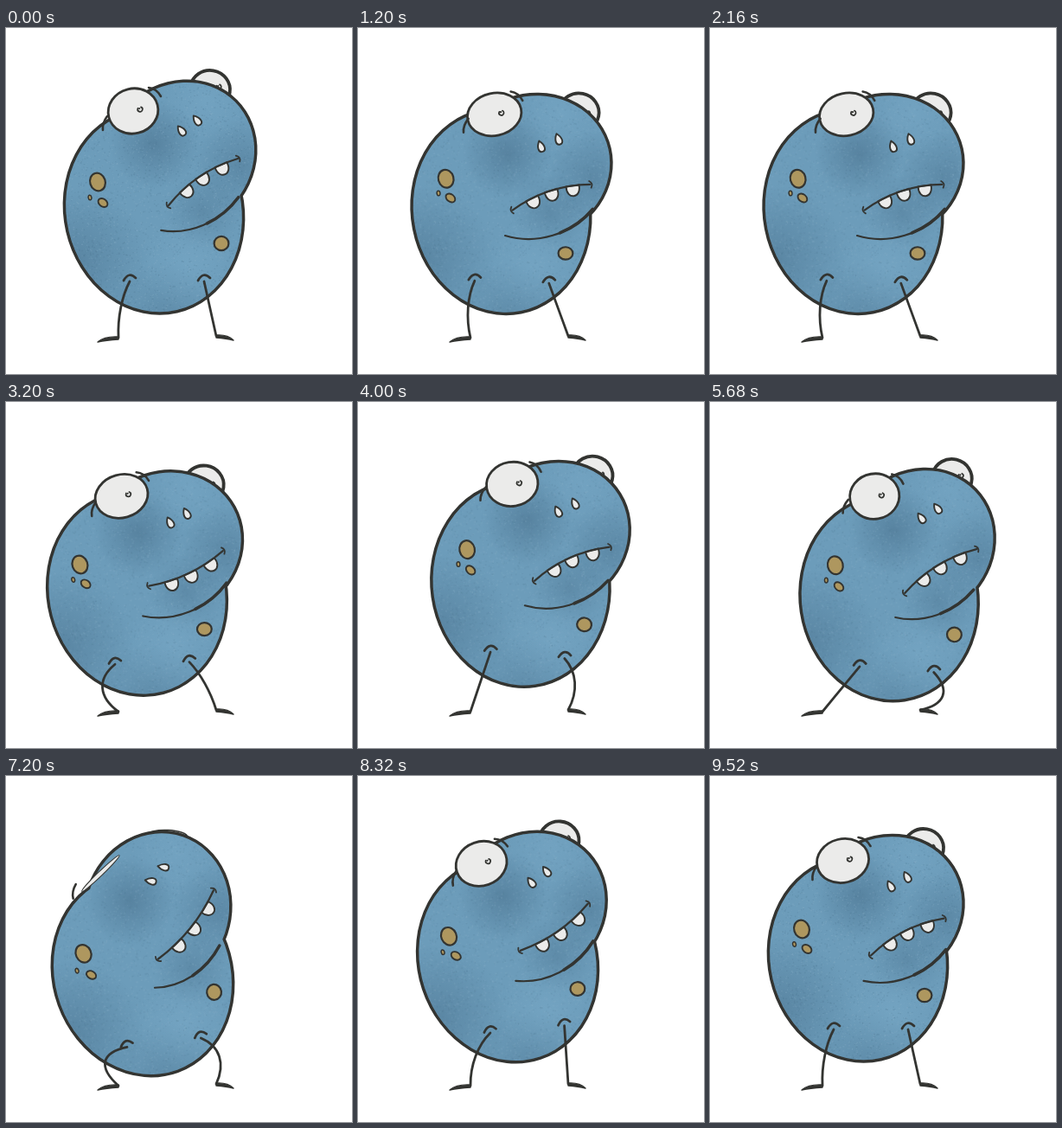
An HTML page with a canvas that plays this animation: 400 px wide and 400 px high, repeating every 9.6 s.

```html
<!DOCTYPE html>
<html lang="en">
<head>
<meta charset="utf-8">
<title>Dancing blob</title>
<style>
html, body { margin: 0; width: 100%; height: 100%; overflow: hidden; background: #fff; }
canvas { display: block; width: 400px; height: 400px; }
</style>
</head>
<body>
<canvas id="stage" width="400" height="400"></canvas>
<script>
const ctx = document.getElementById('stage').getContext('2d');
const LOOP = 9600, STEP = 80, BEAT = 960;
const INK = '#333431', WHITE = '#ebebea', GOLD = '#ae975f';

const clamp = v => Math.max(0, Math.min(1, v));
const smooth = v => { v = clamp(v); return v * v * (3 - 2 * v); };
const mix = (a, b, k) => a + (b - a) * k;
const rad = d => d * Math.PI / 180;

// The body sways once per beat; bouncing and nodding run at twice that rate.
function poseAt(t) {
  const phase = t / BEAT;
  const wave = (peak, rate) => Math.cos(2 * Math.PI * rate * (phase - peak));
  const dance = smooth(t / 320) * (1 - smooth((t - 9000) / 360));
  const lean = dance * (7 * wave(.05, 1) - .3);
  return {
    x: mix(186, 195 + 22 * wave(.92, 1) + 8 * wave(.55, 2), dance),
    y: mix(289, 297 + 9 * wave(.45, 2), dance),
    nod: mix(.58 * wave(-.125, 2), .1 + .9 * wave(.27, 2), dance),
    lean: rad(lean),
    smile: clamp(-lean),
    blink: clamp(1 - Math.abs(t - 7200) / 160)
  };
}

function makeGrain() {
  let seed = 77;
  const rnd = () => (seed = (seed * 16807) % 2147483647) / 2147483647;
  const c = document.createElement('canvas');
  c.width = 260; c.height = 320;
  const g = c.getContext('2d');
  for (let i = 0; i < 6000; i++) {
    g.fillStyle = rnd() < .55 ? 'rgba(145,182,203,.22)' : 'rgba(62,98,122,.16)';
    g.fillRect(rnd() * 260, rnd() * 320, .7 + rnd() * 1.3, .7 + rnd());
  }
  return c;
}
const grain = makeGrain();

function stroke(width) {
  ctx.lineWidth = width;
  ctx.strokeStyle = INK;
  ctx.stroke();
}

function fill(color, width) {
  ctx.fillStyle = color;
  ctx.fill();
  if (width) stroke(width);
}

function curve(width, x0, y0, cx, cy, x1, y1) {
  ctx.beginPath();
  ctx.moveTo(x0, y0);
  ctx.quadraticCurveTo(cx, cy, x1, y1);
  stroke(width);
}

function ellipse(x, y, rx, ry, angle, color, width) {
  ctx.beginPath();
  ctx.ellipse(x, y, rx, ry, angle, 0, 2 * Math.PI);
  fill(color, width);
}

function placed(x, y, angle, paint) {
  ctx.save();
  ctx.translate(x, y);
  ctx.rotate(angle);
  paint();
  ctx.restore();
}

function glow(x, y, r, rgb, alpha) {
  const g = ctx.createRadialGradient(x, y, 0, x, y, r);
  g.addColorStop(0, `rgba(${rgb},${alpha})`);
  g.addColorStop(1, `rgba(${rgb},0)`);
  ctx.fillStyle = g;
  ctx.fillRect(x - r, y - r, 2 * r, 2 * r);
}

// Belly and head are two overlapping ellipses; the head's lower edge is the chin line.
function drawBody(nod) {
  const head = [15 + 5 * nod, -140 + 11 * nod, 90, 82, rad(-45 + 25 * nod)];
  const [hx, hy, ha, hb, turn] = head;
  const shape = new Path2D(), addHead = new Path2D();
  shape.ellipse(-15, -77, 101, 117, rad(-13), 0, 2 * Math.PI);
  addHead.ellipse(...head, 0, 2 * Math.PI);
  shape.addPath(addHead);
  ctx.lineWidth = 7;
  ctx.strokeStyle = INK;
  ctx.stroke(shape);

  ctx.save();
  ctx.clip(shape);
  ctx.fillStyle = '#6c9cba';
  ctx.fillRect(-140, -260, 280, 320);
  const dark = '62,100,128', light = '128,177,207';
  glow(-105, -20, 85, dark, .4);
  glow(0, 50, 70, dark, .3);
  glow(hx - 30, hy - 15, 52, dark, .45);
  glow(hx + 70, hy + 10, 55, dark, .35);
  glow(42, -78, 45, dark, .3);
  glow(25, -15, 55, light, .35);
  glow(hx + 30, hy - 65, 50, light, .3);
  ctx.drawImage(grain, -130, -260);
  ctx.restore();

  for (const [end, width] of [[1.78 + .1 * nod, 2.2], [1.15, 3.6]]) {
    ctx.beginPath();
    ctx.ellipse(hx, hy, ha, hb, turn, .62 - turn, end - turn);
    stroke(width);
  }
}

function pupil(x, y) {
  ctx.beginPath();
  ctx.arc(x, y, 2.8, -1.2, 3.6);
  stroke(1.7);
  ellipse(x - .8, y - .9, 1.1, 1.1, 0, INK);
}

function farEye([x, y], { nod, blink }) {
  ellipse(x, y + 4 * blink, 23, mix(22, 7, blink), .17, WHITE, mix(3.8, 1.5, blink));
  if (blink < .6) pupil(x + 10, y - 3 + 4 * nod);
}

function nearEye([x, y], { nod, blink }) {
  ellipse(x, y - 3 * blink, 29 + 2.5 * nod + 3 * blink, mix(26 - 1.5 * nod, 2.6, blink),
    rad(mix(-14, -37, blink)), WHITE, mix(2.8, 1, blink));
  curve(2.6, x - 35, y + 22, x - 36, y + 14, x - 30, y + 6);
  if (blink > .6) return;
  pupil(x + 8, y - 2);
  curve(2.6, x + 18, y - 27, x + 27, y - 26, x + 32, y - 17);
}

function nostril([x, y], { nod, blink }) {
  placed(x, y, -.65 - .4 * blink + .3 * nod, () => {
    ctx.beginPath();
    ctx.moveTo(0, -7);
    ctx.bezierCurveTo(5, -1, 5, 6, 0, 6);
    ctx.bezierCurveTo(-5, 6, -5, -1, 0, -7);
    fill(WHITE, 1.9);
  });
}

function tooth(x, y, angle) {
  placed(x, y, angle, () => {
    ctx.beginPath();
    ctx.moveTo(-7.5, 0);
    ctx.bezierCurveTo(-9, 16, 9, 16, 7.5, 0);
    ctx.closePath();
    fill(WHITE, 1.9);
  });
}

function drawMouth([ax, ay], [bx, by], smile) {
  ay -= 5 * smile;
  by -= 5 * smile;
  const angle = Math.atan2(by - ay, bx - ax), half = Math.hypot(bx - ax, by - ay) / 2;
  const bend = mix(-15, 13, smile);
  placed((ax + bx) / 2, (ay + by) / 2, angle, () => {
    for (const u of [-.46, .04, .58]) {
      tooth(u * half, bend * (1 - u * u) / 2, Math.atan(-u * bend / half));
    }
    curve(2.3, -half, 0, 0, bend, half, 0);
    curve(1.8, -half, -4, -half - 4, 0, -half, 4);
    curve(1.8, half, -4, half + 4, 0, half, 4);
  });
}

function drawLeg(p, side, footX, footY, length) {
  const cos = Math.cos(p.lean), sin = Math.sin(p.lean);
  const hx = p.x + side * 43 * cos - 4 * sin, hy = p.y + side * 43 * sin + 4 * cos;
  const dx = footX - hx, dy = footY - hy, d = Math.hypot(dx, dy);
  const slack = .57 * Math.sqrt(Math.max(0, length * length - d * d));
  const nx = side * dy / d * slack, ny = -side * dx / d * slack;
  ctx.beginPath();
  ctx.moveTo(hx, hy);
  ctx.bezierCurveTo(hx + dx * .28 + nx, hy + dy * .28 + ny,
    hx + dx * .66 + nx, hy + dy * .66 + ny, footX, footY);
  stroke(2.8);
  const toe = side < 0 ? -24 : 20;
  ctx.beginPath();
  ctx.moveTo(footX, footY - 1);
  ctx.quadraticCurveTo(footX + toe * .65, footY - 2, footX + toe, footY + 5);
  ctx.quadraticCurveTo(footX + toe * .6, footY + 3, footX, footY + 2);
  ctx.closePath();
  fill(INK, 1.4);
}

function draw(t) {
  const p = poseAt(t);
  // A feature's place relative to the hips, and how far it slides per unit of nod
  const at = (x, y, dx, dy) => [x + dx * p.nod, y + dy * p.nod];
  ctx.fillStyle = '#fff';
  ctx.fillRect(0, 0, 400, 400);
  ctx.lineCap = ctx.lineJoin = 'round';

  placed(p.x, p.y, p.lean, () => {
    farEye(at(50, -218, 22, 24), p);
    drawBody(p.nod);
    nearEye(at(-39, -193, 13, 4), p);
    nostril(at(17, -170, 12, 17), p);
    nostril(at(35, -182, 14, 20), p);
    drawMouth(at(2, -84, -4, 5), at(82, -138, 5, 27), p.smile);
    ellipse(...at(-80, -111, 0, -2), 8.8, 10.5, -.3, GOLD, 2.2);
    ellipse(...at(-89, -93, 1, -3), 1.9, 2.8, -.2, GOLD, 1.5);
    ellipse(...at(-74, -87, 0, -4), 6, 4.3, .65, GOLD, 1.9);
    ellipse(...at(63, -40, -2, 9), 8.4, 8.2 - p.nod, 0, GOLD, 2.2);
    for (const hip of [-43, 43]) curve(2.8, hip - 7, 3, hip - 1, -8, hip + 7, 0);
  });

  drawLeg(p, -1, 130, 358, 67);
  drawLeg(p, 1, 243, 356, 64);
}

const start = performance.now();
function frame() {
  const t = (performance.now() - start) % LOOP;
  draw(Math.floor(t / STEP) * STEP);
  requestAnimationFrame(frame);
}
frame();
</script>
</body>
</html>
```
